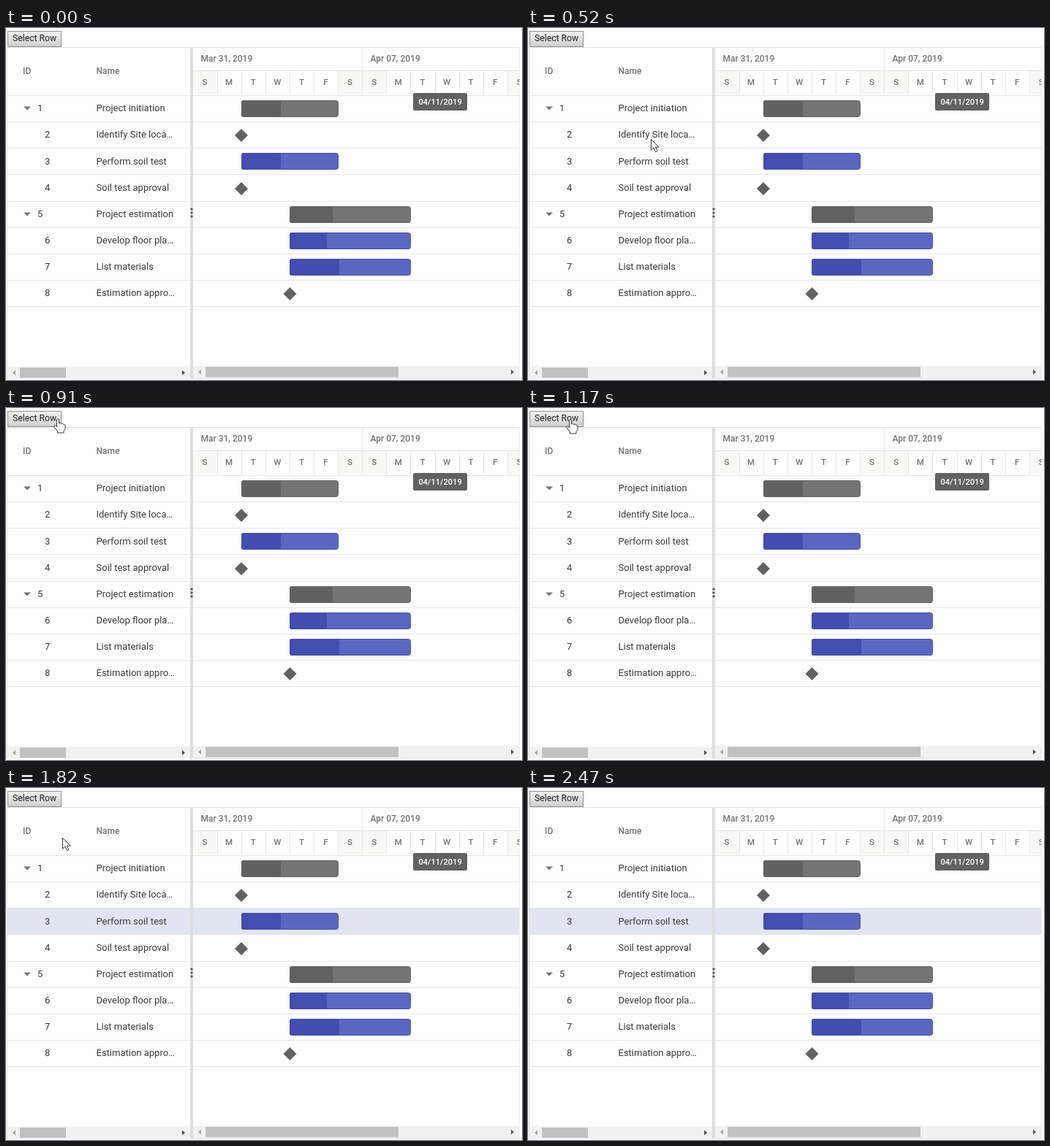
An HTML page for the animation above (3.38 s loop, 706 by 482 pixels).

```html
<!DOCTYPE html>
<html lang="en">
<head>
<meta charset="utf-8">
<title>Gantt row selection</title>
<style>
  html, body { margin: 0; width: 100%; height: 100%; overflow: hidden; background: #fff; }
  svg { display: block; width: 706px; height: 482px; }
  text { font: 13px Roboto, sans-serif; fill: #3a3a3a; }
  text.head { font-size: 12px; font-weight: 500; fill: #747474; }
  text.day { font-size: 11.5px; text-anchor: middle; }
  text.tip { font-size: 11.1px; font-weight: 500; fill: #fff; }
  text.button { font-size: 12.2px; fill: #222; }
</style>
</head>
<body>
<svg id="stage" viewBox="0 0 706 482">
  <defs>
    <clipPath id="pane"><rect x="1" y="0" width="701.5" height="482"/></clipPath>
    <linearGradient id="face" x2="0" y2="1">
      <stop stop-color="#f2f2f2"/><stop offset="1" stop-color="#cfcfcf"/>
    </linearGradient>
  </defs>
  <g id="chart" clip-path="url(#pane)"></g>
  <g id="tooltip">
    <path d="M122 96H232a2 2 0 0 1 2 2V118a2 2 0 0 1-2 2H183l-6 6-6-6H122a2 2 0 0 1-2-2V98a2 2 0 0 1 2-2Z" fill="#616161"/>
    <text class="tip" x="127" y="112">Identify Site location</text>
  </g>
  <path id="arrow" d="M.5 .5V15.2L4 12l2.6 5.6 2.3-1-2.5-5.4h4.8Z" fill="#fff" stroke="#33354a"/>
  <path id="hand" d="M-1.5 1.5q1.5-2 3 0V7q2-1.4 3 .6 2-1 3 .8 2-.6 2.5 1.4v4.7L8 17.5V20H-.5v-2L-5 12q-.8-2.5 1.2-2.3l2.3 2.2Z" fill="#fff" stroke="#33354a" stroke-linejoin="round"/>
</svg>
<script>
const byId = id => document.getElementById(id);
const chart = byId('chart');
const STEP = 130, LOOP = 3380;
const ROW_H = 36.15, DAY_W = 33.1, BODY_TOP = 92, CHART_X = 255.5;

function add(tag, attrs, content = '') {
  const el = document.createElementNS('http://www.w3.org/2000/svg', tag);
  for (const name in attrs) el.setAttribute(name, attrs[name]);
  el.textContent = content;
  return chart.appendChild(el);
}
const rect = (x, y, width, height, fill, more) => add('rect', { x, y, width, height, fill, ...more });
const label = (x, y, content, cls = '') => add('text', { x, y, class: cls }, content);
const path = (d, fill) => add('path', { d, fill });
const rowTop = row => Math.round(BODY_TOP + row * ROW_H);
const dayX = day => Math.round(CHART_X + day * DAY_W);
const GRID = '#e6e6e6';

// Button and panel
rect(2.5, 4.5, 73, 21, 'url(#face)', { stroke: '#8f8f8f' });
label(9, 18, 'Select Row', 'button');
rect(1.5, 26.5, 701, 453, '#fefefe', { stroke: '#dedede' });

// Headers
label(23, 63, 'ID', 'head');
label(123.5, 63, 'Name', 'head');
label(266.5, 46, 'Mar 31, 2019', 'head');
label(498.5, 46, 'Apr 07, 2019', 'head');
for (let day = 0; day < 14; day++) {
  if (day % 7 === 0 || day % 7 === 6) rect(dayX(day), 59, DAY_W, 32, '#f8f8f7');
  if (day) rect(dayX(day), day === 7 ? 27 : 59, 1, day === 7 ? 64 : 32, GRID);
  label(CHART_X + 16.5 + day * DAY_W, 78.3, 'SMTWTFS'[day % 7], 'head day');
}
rect(256, 58, 447, 1, GRID);

// Selection layers lie below the grid lines
const selection = rect(2, rowTop(2), 701, 37, '#e1e5f1');
const hover = rect(2, rowTop(2), 249, 37, '#e7e7f2');
for (let row = 0; row <= 8; row++) rect(2, rowTop(row), 701, 1, GRID);
const band = rect(256, 164, 447, 5, '#e0e0e0');

// Tasks: name, start x, end x, progress x; a milestone has only a start
const tasks = [
  ['Project initiation', 322, 455, 376],
  ['Identify Site loca…', 322],
  ['Perform soil test', 322, 455, 376],
  ['Soil test approval', 322],
  ['Project estimation', 388, 554, 447],
  ['Develop floor pla…', 388, 554, 439],
  ['List materials', 388, 554, 456],
  ['Estimation appro…', 388.5],
];
tasks.forEach(([name, start, end, progress], row) => {
  const parent = row % 4 === 0;
  const baseline = 114.3 + row * ROW_H;
  const top = Math.round(99 + row * 36.2);
  label(parent ? 43 : 53, baseline, row + 1);
  label(123.5, baseline, name);
  if (parent) path(`M24 ${top + 8.5}h10l-5 5Z`, '#777');
  if (!end) return path(`M${start} ${top + 3}l9 9-9 9-9-9Z`, '#616161');
  const [dark, light, edge] = parent ? ['#616161', '#747474', '#626262'] : ['#424eb0', '#5a67c1', '#4350b2'];
  rect(start + .5, top + .5, end - start - 1, 22, light, { rx: 3, stroke: edge });
  path(`M${progress} ${top}H${start + 3}q-3 0-3 3v17q0 3 3 3H${progress}Z`, dark);
});

// Date marker
rect(557, 89, 74, 24, '#616161', { rx: 2 });
label(564.5, 105, '04/11/2019', 'tip');

// Scrollbars and splitter
function scrollbar(x, end, y, thumbX, thumbEnd) {
  rect(x, y - 8.5, end - x, 16.5, '#f1f1f1');
  rect(thumbX, y - 7, thumbEnd - thumbX, 14, '#c1c1c1');
  path(`M${x + 11} ${y - 3.5}v7l-4-3.5Z`, '#a3a3a3');
  path(`M${end - 11} ${y - 3.5}v7l4-3.5Z`, '#505050');
}
scrollbar(2, 252, 472, 19, 82);
scrollbar(256, 702, 471, 273, 537);
rect(252, 27, 4, 453, '#dedede');
for (const y of [248, 253, 258]) rect(252.5, y - 1.5, 3, 3, '#555', { rx: 1 });

// Cursor stops: step, x, y
const visits = [
  [[1, 340, 465], [2, 287, 369], [5, 108, 43], [7, 71, 14], [8, 62, 15], [10, 53, 15], [13, 53, 15]],
  [[13, 53, 15], [16, 124, 174], [18, 220, 390]],
];

function cursorAt(step) {
  const stops = visits[step < 14 ? 0 : 1];
  const next = stops.findIndex(stop => stop[0] >= step);
  if (next < 0 || step < stops[0][0]) return null;
  const to = stops[next], from = stops[Math.max(0, next - 1)];
  const part = (step - from[0]) / (to[0] - from[0] || 1);
  return [1, 2].map(i => from[i] + (to[i] - from[i]) * part);
}

const show = (el, visible) => { el.style.display = visible ? '' : 'none'; };

function draw(now) {
  const step = Math.floor((now % LOOP) / STEP);
  const position = cursorAt(step);
  const pointing = step >= 7 && step < 14;
  for (const [id, active] of [['arrow', !pointing], ['hand', pointing]]) {
    show(byId(id), position && active);
    if (position) byId(id).setAttribute('transform', `translate(${position.map(Math.round)})`);
  }
  show(selection, step >= 10);
  show(band, step >= 10 && step < 14);
  show(hover, step === 16);
  byId('tooltip').style.opacity = step === 5 ? .65 : 0;
  requestAnimationFrame(draw);
}
requestAnimationFrame(draw);
</script>
</body>
</html>
```
